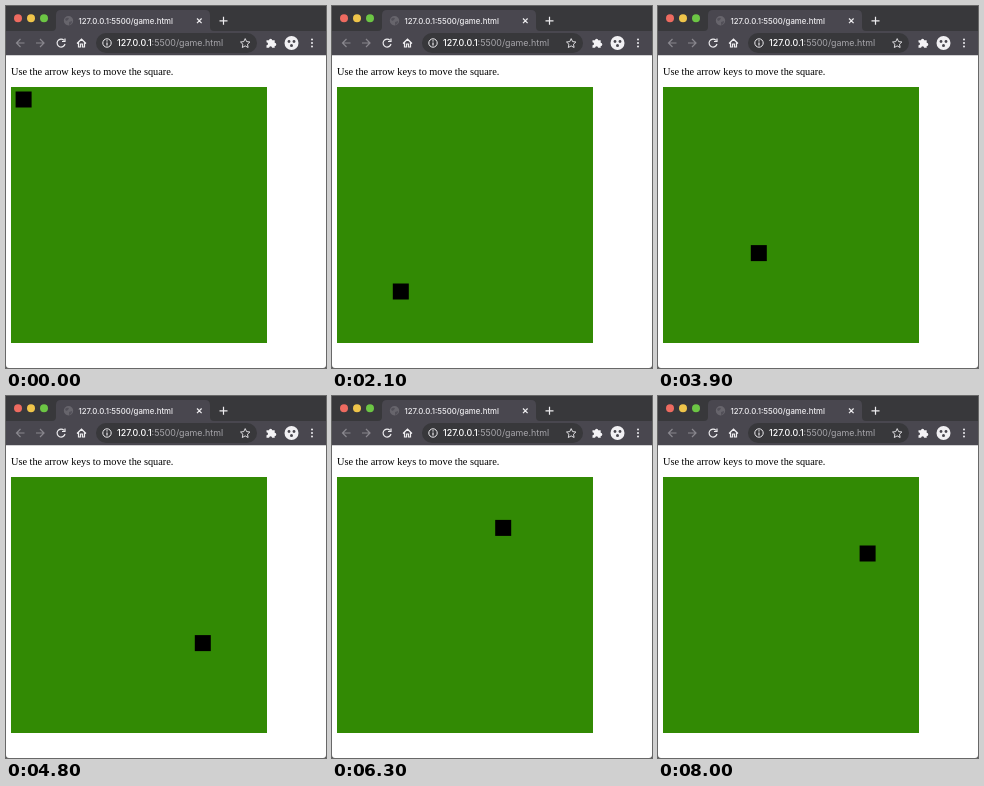
An HTML page for the animation above (8100 ms loop, 320x362 px).

```html
<!DOCTYPE html>
<html lang="en">
<head>
<meta charset="utf-8">
<title>Move the square</title>
<style>
  html, body { margin: 0; width: 100%; height: 100%; overflow: hidden; background: #fff; }
  svg { display: block; }
  .ui { font: 500 7.8px Inter, Roboto, sans-serif; }
  .address { font-size: 8.9px; }
  .page { font: 10.3px "Liberation Serif", Times, serif; }
  .icon { fill: none; stroke: #eeedf0; stroke-width: 1.2; }
  .dim { stroke: #89878e; }
</style>
</head>
<body>
<svg width="320" height="362" viewBox="0 0 320 362">
  <defs>
    <clipPath id="board"><rect x="5" y="81" width="256" height="256"/></clipPath>
  </defs>

  <!-- Tab strip -->
  <rect width="320" height="26" fill="#38383b"/>
  <path d="M0 25H46Q50 25 50 21V9Q50 4 55 4H199Q204 4 204 9V21Q204 25 208 25H320V49.300H0Z" fill="#49474f"/>
  <circle cx="12" cy="12.200" r="4" fill="#ee6b60"/>
  <circle cx="25" cy="12.200" r="4" fill="#efc54a"/>
  <circle cx="38" cy="12.200" r="4" fill="#6cc644"/>
  <circle cx="62.500" cy="14.700" r="4.700" fill="#67656c"/>
  <path d="M59 13q2 -2 4 -1l-1 2 -2 1zM63 16l3 -1q0 3 -3 4z" fill="#525058"/>
  <text class="ui" x="72.500" y="17.500" fill="#eeedf0">127.0.0.1:5500/game.html</text>
  <path class="icon" d="M191 12.500l4.600 4.600m0 -4.600l-4.600 4.600M217.500 10.800v8m-4 -4h8"/>

  <!-- Toolbar -->
  <rect x="90" y="27" width="161" height="20" rx="10" fill="#38383b"/>
  <g class="icon">
    <path class="dim" d="M18.500 37h-8m4 -4l-4 4 4 4M30 37h8m-4 -4l4 4 -4 4"/>
    <path d="M58 34.300a4 4 0 1 0 1 3.700M59 32.500v3h-3"/>
    <path d="M71 37.500l4.500 -4.300 4.500 4.300M72.500 36.500v4.500h2v-3h2v3h2v-4.500"/>
    <circle cx="101" cy="37" r="4.200" stroke-width="1"/>
    <path d="M101 36.500v3M101 34.300v1.100"/>
    <path d="M239.200 32.600l1.400 3 3.300 .4 -2.400 2.200 .6 3.300 -2.900 -1.600 -2.900 1.600 .6 -3.300 -2.400 -2.200 3.300 -.4z" stroke-width=".9"/>
  </g>
  <text class="ui address" x="111" y="40.200" fill="#fff">127.0.0.1<tspan fill="#a7a6ab" font-weight="400">:5500/game.html</tspan></text>
  <path d="M260.500 34.300h2.500a1.600 1.600 0 0 1 3.200 0h2.500v2.500a1.600 1.600 0 0 1 0 3.200v1.800h-2.600a1.500 1.500 0 0 0 -3 0h-2.600v-2.600a1.500 1.500 0 0 0 0 -3z" fill="#f4f3f6"/>
  <circle cx="285.500" cy="37" r="7" fill="#f1f0f3"/>
  <g fill="#49474f">
    <circle cx="283" cy="35.500" r="1.400"/>
    <circle cx="288" cy="35.500" r="1.400"/>
    <circle cx="285.500" cy="39.500" r="1.500"/>
  </g>
  <g fill="#eeedf0">
    <circle cx="306" cy="33.500" r="1"/>
    <circle cx="306" cy="37" r="1"/>
    <circle cx="306" cy="40.500" r="1"/>
  </g>

  <!-- Page -->
  <text class="page" x="5" y="69" fill="#000">Use the arrow keys to move the square.</text>
  <rect x="5" y="81" width="256" height="256" fill="#328a04"/>
  <g clip-path="url(#board)">
    <rect id="square" width="16" height="16"/>
  </g>
  <path d="M0 359Q0 362 3 362H0ZM320 359Q320 362 317 362H320Z" fill="#555"/>
</svg>
<script>
  const LOOP = 8100, TICK = 100, STEP = 6.4;
  const square = document.getElementById('square');

  // Key presses: start time, axis, then the cell reached at each tick.
  // The board wraps, so cell -1 leads on to cell 38.
  const presses = [
    [300, 'y', -1],
    [500, 'y', 38, 36, 33],
    [1200, 'y', 32],
    [1400, 'y', 31, 30],
    [1600, 'x', 1],
    [1900, 'x', 3, 5, 8, 11, 13],
    [2600, 'y', 29],
    [2800, 'y', 26, 23, 20, 18, 15],
    [3400, 'y', 16],
    [3700, 'y', 19, 22, 24],
    [4100, 'x', 14],
    [4300, 'x', 16, 18, 21, 24, 26, 28],
    [5100, 'y', 23],
    [5300, 'y', 20, 17, 14, 12, 9, 6],
    [6000, 'x', 27],
    [6300, 'x', 24, 21, 18, 15, 12, 10, 7, 4, 1, 38, 36, 33, 30],
    [7700, 'y', 7],
    [7900, 'y', 9, 10]
  ];

  function cellAt(t) {
    const cell = { x: 0, y: 0 };
    for (const [start, axis, ...cells] of presses) {
      if (t < start) break;
      const i = Math.floor((t - start) / TICK);
      cell[axis] = cells[Math.min(i, cells.length - 1)];
    }
    return cell;
  }

  function draw(now) {
    const { x, y } = cellAt(now % LOOP);
    square.setAttribute('x', 9.6 + x * STEP);
    square.setAttribute('y', 85.5 + y * STEP);
  }

  const origin = performance.now();
  function frame() {
    draw(performance.now() - origin);
    requestAnimationFrame(frame);
  }
  frame();
</script>
</body>
</html>
```
